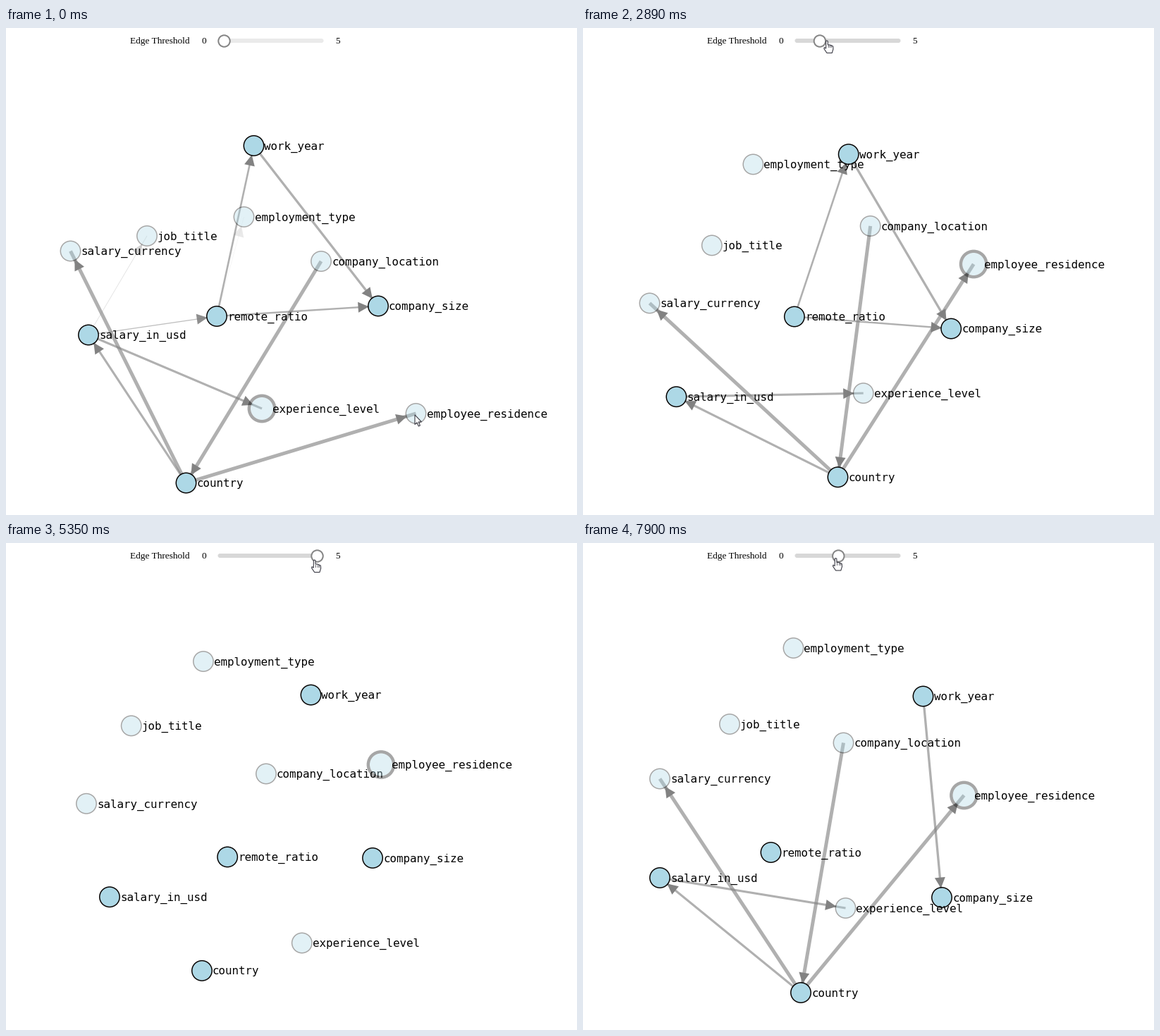
A matplotlib script that plays this animation: 810 px wide and 691 px high, repeating every 8 s.

```python
import numpy as np
import matplotlib.pyplot as plt
from matplotlib.animation import FuncAnimation
from matplotlib.patches import Circle, FancyBboxPatch, Polygon

W, H, DPI = 810, 691, 100
PX = 72 / DPI
LOOP, INTERVAL = 8000, 40

fig = plt.figure(figsize=(W / DPI, H / DPI), dpi=DPI, facecolor="white")
ax = fig.add_axes([0, 0, 1, 1])
ax.set(xlim=(0, W), ylim=(H, 0))
ax.axis("off")

# The picture refreshes in runs of 120 ms steps: (start, count)
RUNS = [(0, 1), (150, 2), (420, 7), (1260, 4), (1870, 3), (2380, 4), (2890, 7),
        (3730, 7), (4570, 2), (4840, 1), (4990, 7), (5830, 1), (5980, 2),
        (6250, 2), (6520, 7), (7360, 1), (7510, 1), (7660, 3)]
STEPS = np.array([start + 120 * k for start, n in RUNS for k in range(n)])

# Legs between successive layouts: (start, end, decay); decay 0 is smoothstep
LEGS = [(0, 1140, 7), (2260, 3610, 3), (3610, 4500, 3),
        (4570, 6100, 3), (6100, 7000, 0), (7000, 7900, 4)]

DRAG = [(4570, 532, 338), (5830, 532, 300), (5980, 560, 255), (6100, 605, 214),
        (6370, 535, 235), (6640, 520, 280), (7000, 502, 344)]
POINTER = [(0, 580, 549), (150, 600, 472), (270, 607, 443), (420, 612, 420),
           (1140, 408, 17), (1260, 405, 17), (1620, 312, 18), (1870, 312, 18),
           (2110, 338, 18), (2740, 338, 18), (3610, 384, 17.5), (4450, 390, 18),
           (4570, 437, 24), (5830, 438, 24), (5980, 560, 253), (6100, 605, 207),
           (6370, 500, 112), (6520, 441, 20), (6640, 388, 18), (7510, 388, 19),
           (7900, 358.5, 21.5)]
THUMB = [(0, 0), (1990, 1), (3010, 2), (3370, 3), (4570, 5), (6520, 4),
         (6640, 3), (7780, 2)]
THRESHOLD = [(0, 0), (2380, 1), (3730, 3), (4690, 5), (6760, 3)]


def along(path, t):
    times, xs, ys = zip(*path)
    return np.array([np.interp(t, times, xs), np.interp(t, times, ys)])


def current(changes, t):
    return [value for start, value in changes if start <= t][-1]


def ease(u, decay):
    if decay == 0:
        return u * u * (3 - 2 * u)
    return (1 - np.exp(-decay * u)) / (1 - np.exp(-decay))


class Node:
    count = 0

    def __init__(self, name, faded, *layouts):
        self.layouts = np.array(layouts, float)
        alpha = 0.35 if faded else 1
        z = 10 + Node.count
        Node.count += 1
        self.fill = ax.add_patch(Circle((0, 0), 14, fc="lightblue", lw=0, alpha=alpha, zorder=z))
        self.ring = ax.add_patch(Circle((0, 0), 14, fill=False, ec="black", alpha=alpha, zorder=z))
        self.label = ax.text(0, 0, name, family="DejaVu Sans Mono", size=15.85 * PX,
                             va="baseline", zorder=z)

    def place(self, pos, selected):
        radius, width = (18.2, 4.4) if selected else (14.2, 1.5)
        self.fill.set(center=pos, radius=radius - width / 2)
        self.ring.set(center=pos, radius=radius, linewidth=width * PX)
        self.label.set_position((pos[0] + 15, pos[1] + 5.6))


nodes = {}


def add_node(name, faded, *layouts):
    nodes[name] = Node(name, faded, *layouts)


add_node("employment_type", True, (337.5, 268), (285, 266), (230, 174.5), (261, 161),
         (284, 169.5), (287, 179.5), (298.5, 149))
add_node("work_year", False, (351.5, 167), (322, 164.5), (391, 183), (463, 197),
         (426, 219.5), (431.5, 187), (482.5, 217.5))
add_node("job_title", True, (200, 295), (186, 333), (182, 302), (200, 291.5),
         (173, 252.5), (177, 250), (208, 257))
add_node("salary_currency", True, (91.5, 316.5), (87, 375), (96.5, 394.5), (97.5, 357),
         (117.5, 372.5), (94.5, 320), (109, 334.5))
add_node("company_location", True, (447, 331), (437, 288.5), (400, 279), (357, 278),
         (371.5, 338), (385, 265.5), (369.5, 283.5))
add_node("company_size", False, (528, 394.5), (521, 367.5), (522.5, 442), (518, 479.5),
         (520.5, 440), (519, 464.5), (509, 503))
add_node("remote_ratio", False, (299, 409), (301.5, 411.5), (299.5, 409), (305.5, 426.5),
         (316, 449.5), (298.5, 444), (266.5, 439))
add_node("salary_in_usd", False, (117, 435.5), (136, 489.5), (131.5, 532), (114, 494),
         (154, 504), (111.5, 455.5), (109, 475))
add_node("experience_level", True, (363, 540), (400.5, 524.5), (397, 516.5), (379, 530),
         (428.5, 575.5), (365.5, 546), (372.5, 518))
add_node("employee_residence", True, (581.5, 547), (614, 413.5), (538.5, 314.5), (531.5, 338),
         (605, 214), (502, 343.5), (540.5, 358))
add_node("country", False, (255.5, 645.5), (338.5, 642), (367.5, 636), (327, 639),
         (267.5, 600), (320, 646.5), (309, 638))


class Edge:
    def __init__(self, source, target, weight, width, line_alpha=0.62, head_alpha=1):
        self.source, self.target, self.weight = source, target, weight
        self.line, = ax.plot([], [], color="#808080", lw=width * PX, alpha=line_alpha,
                             solid_capstyle="butt", zorder=2)
        self.head = ax.add_patch(Polygon(np.zeros((3, 2)), fc="#828282", lw=0,
                                         alpha=head_alpha, zorder=2))

    def place(self, spots, threshold):
        a, b = spots[self.source], spots[self.target]
        d = (b - a) / np.hypot(*(b - a))
        side = np.array([-d[1], d[0]]) * 7.5
        self.line.set_data([a[0], b[0]], [a[1], b[1]])
        self.head.set_xy([b - 13.3 * d, b - 28.5 * d + side, b - 28.5 * d - side])
        for part in (self.line, self.head):
            part.set_visible(self.weight > threshold)


edges = [
    Edge("remote_ratio", "employment_type", 0.2, 0.6, 0.1, 0.17),
    Edge("salary_in_usd", "job_title", 0.5, 0.9, 0.22, 0.35),
    Edge("salary_in_usd", "remote_ratio", 0.9, 1.3, 0.5, 0.9),
    Edge("remote_ratio", "company_size", 2.4, 2.4),
    Edge("remote_ratio", "work_year", 2.6, 2.6),
    Edge("work_year", "company_size", 3.3, 3.3),
    Edge("salary_in_usd", "experience_level", 3.1, 3.1),
    Edge("country", "salary_in_usd", 3.1, 3.1),
    Edge("country", "salary_currency", 5, 5),
    Edge("company_location", "country", 5, 5),
    Edge("country", "employee_residence", 5, 5),
]

for x, text in ((175.5, "Edge Threshold"), (277, "0"), (467.5, "5")):
    ax.text(x, 22, text, family="Liberation Serif", size=13.33 * PX, va="baseline")

track = ax.add_patch(FancyBboxPatch((303.5, 18), 144, 0.01, lw=0,
                                    boxstyle="round,pad=3,rounding_size=3"))
thumb = ax.add_patch(Circle((309.5, 18.5), 8.2, fc="white", ec="#858585", lw=2 * PX, zorder=3))

ARROW = np.array([(0, 0), (0, 13.5), (3, 10.8), (5.2, 16), (7.4, 15), (5.2, 10), (9.3, 9.7)])
HAND = np.array([(-1.3, 0.8), (0, 0), (1.3, 0.8), (1.5, 6), (4, 6), (6.5, 7), (8.7, 8),
                 (9, 12), (7.3, 17.5), (0, 17.5), (-4, 11.5), (-3.6, 9.7), (-1.3, 11)])
pointer = ax.add_patch(Polygon(ARROW, fc="white", ec="#3a3a44", lw=1.1 * PX,
                               joinstyle="round", zorder=40))
knuckles = [ax.plot([], [], color="#3a3a44", lw=0.8 * PX, zorder=41)[0] for _ in range(3)]


def layout_at(t):
    leg = max(i for i, (start, _, _) in enumerate(LEGS) if start <= t)
    start, end, decay = LEGS[leg]
    p = ease(min((t - start) / (end - start), 1), decay)
    spots = {name: n.layouts[leg] * (1 - p) + n.layouts[leg + 1] * p
             for name, n in nodes.items()}
    if DRAG[0][0] <= t < DRAG[-1][0]:
        spots["employee_residence"] = along(DRAG, t)
    return spots


def draw_pointer(t, on_slider):
    tip = along(POINTER, t)
    pointer.set_xy(tip + (HAND if on_slider else ARROW))
    for dx, line in zip((1.6, 4, 6.4), knuckles):
        line.set_data([tip[0] + dx] * 2, [tip[1] + 6.5, tip[1] + 9.5])
        line.set_visible(on_slider)


def draw(frame):
    now = frame * INTERVAL + 30
    t = STEPS[STEPS <= now][-1]
    spots = layout_at(t)
    selected = "experience_level" if t < 150 else "employee_residence"
    for name, node in nodes.items():
        node.place(spots[name], name == selected)
    threshold = current(THRESHOLD, t)
    for edge in edges:
        edge.place(spots, threshold)
    on_slider = bool(1870 <= t < 5980 or t >= 6520)
    track.set_facecolor("#d8d8d8" if on_slider else "#eaeaea")
    thumb.set_center((309.5 + 26.4 * current(THUMB, t), 18.5))
    draw_pointer(t, on_slider)
    return []


anim = FuncAnimation(fig, draw, frames=LOOP // INTERVAL, interval=INTERVAL,
                     repeat=True, repeat_delay=0, blit=False)
plt.show()
```
